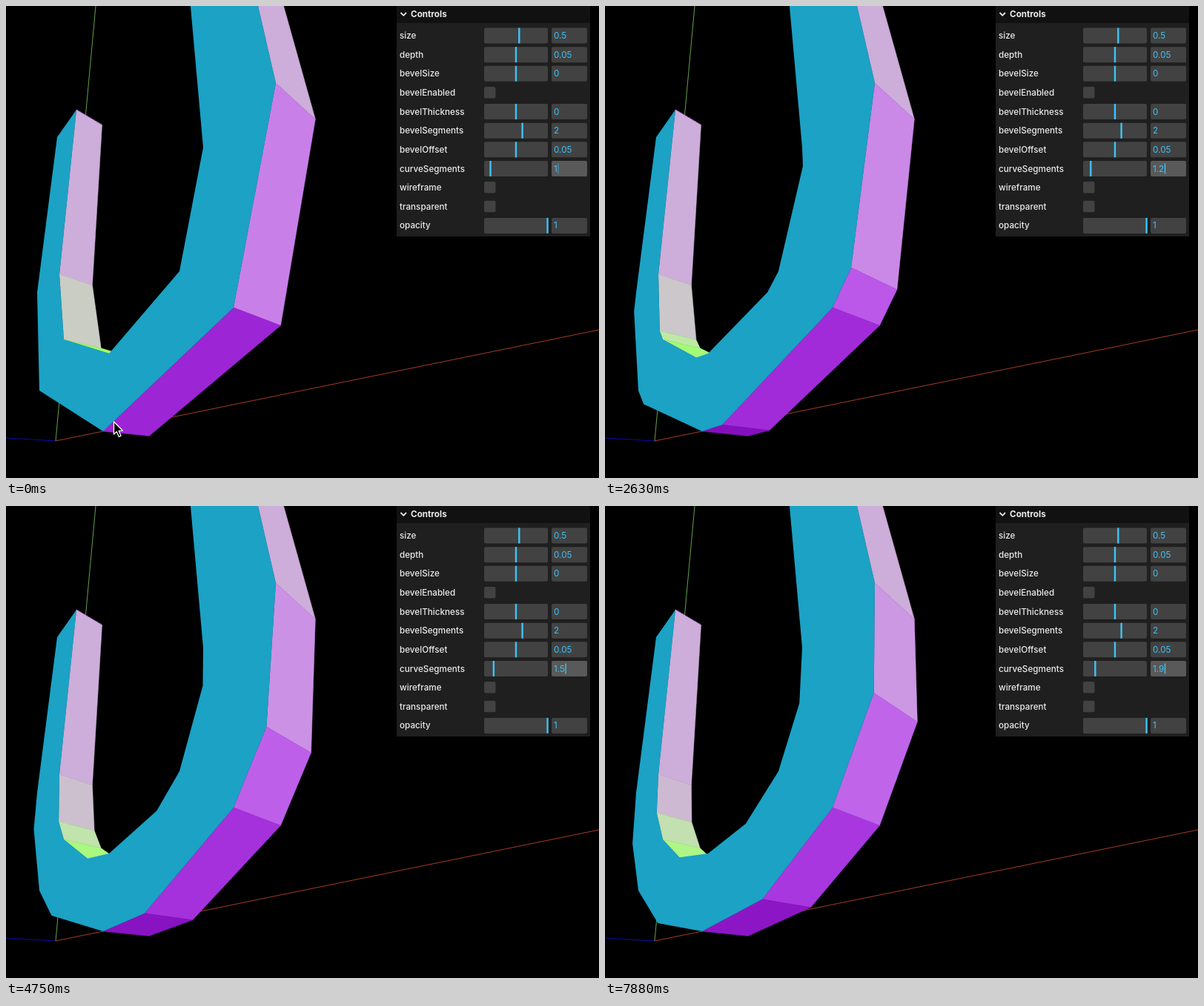
Write an HTML page with a canvas that moves like this. It is 800 px wide and 637 px high and loops after 8 s.

```html
<!DOCTYPE html>
<html lang="en">
<head>
<meta charset="utf-8">
<title>Extruded letter controls</title>
<style>
  html, body { margin: 0; width: 100%; height: 100%; overflow: hidden; background: #000; }
  canvas { display: block; }
</style>
</head>
<body>
<canvas id="stage" width="800" height="637"></canvas>
<script>
const ctx = document.getElementById('stage').getContext('2d');
const LOOP = 8000, STEP = 125;

// Perspective: vanishing point of the extrusion, optical centre and focal length.
const VANISH = [973, 660], CENTER = [186, 390], FOCAL = 545;
const FACE_NORMAL = [-0.791, 0.271, 0.548];

// Front outline, clockwise: [x, y] is a line, [cx, cy, x, y] a quadratic curve.
const OUTLINE = [
  [317, -100], [364, 104],
  [395, 238.5, 307, 407], [228, 553, 131, 574], [66, 587.5, 45, 519], [31, 471, 42, 387],
  [69, 177], [95, 140], [72, 362],
  [64.5, 420, 78, 450], [92.5, 489, 139, 469], [192, 446.5, 234, 358], [273, 269, 266, 191],
  [240, -100]
];

// Times at which curveSegments grows by 0.1.
const KEYS = [1880, 2500, 3250, 4000, 4630, 5380, 6250, 7000, 7500];

const ROWS = [
  ['size', 0.55, '0.5'], ['depth', 0.5, '0.05'], ['bevelSize', 0.5, '0'], ['bevelEnabled'],
  ['bevelThickness', 0.5, '0'], ['bevelSegments', 0.6, '2'], ['bevelOffset', 0.5, '0.05'],
  ['curveSegments'], ['wireframe'], ['transparent'], ['opacity', 0.995, '1']
];

// Inverse depth on the front plane is linear in screen space.
const nearness = ([x, y]) => 0.0107 + 0.000214 * x + 0.0000714 * y;

function extrude(p) {
  const h = nearness(p);
  return p.map((v, i) => (v + h * VANISH[i]) / (1 + h));
}

// Point on a quadratic curve seen in perspective.
function curvePoint(a, c, b, t) {
  const pts = [a, c, b];
  const w = [(1 - t) ** 2, 2 * t * (1 - t), t * t].map((k, i) => k / nearness(pts[i]));
  const sum = w[0] + w[1] + w[2];
  return [0, 1].map(i => (a[i] * w[0] + c[i] * w[1] + b[i] * w[2]) / sum);
}

// A fractional segment count samples each curve at 0 and 1/n only.
function outlinePoints(segments) {
  const pts = [];
  for (const s of OUTLINE) {
    const end = s.slice(-2);
    if (s.length === 4 && segments > 1) {
      pts.push(curvePoint(pts[pts.length - 1], s.slice(0, 2), end, 1 / segments));
    }
    pts.push(end);
  }
  return pts;
}

const toView = p => {
  const z = 1 / nearness(p);
  return [(p[0] - CENTER[0]) * z, (CENTER[1] - p[1]) * z, -FOCAL * z];
};

const normalColor = n => {
  const len = Math.hypot(...n);
  return `rgb(${n.map(v => Math.round((v / len + 1) * 127.5)).join()})`;
};

function sideColor(p, q) {
  const a = toView(p), b = toView(q), n = FACE_NORMAL;
  const d = b.map((v, i) => v - a[i]);
  return normalColor([
    n[1] * d[2] - n[2] * d[1],
    n[2] * d[0] - n[0] * d[2],
    n[0] * d[1] - n[1] * d[0]
  ]);
}

function polygon(pts, color) {
  ctx.beginPath();
  pts.forEach(p => ctx.lineTo(...p));
  ctx.closePath();
  ctx.fillStyle = color;
  ctx.fill();
}

function line(color, width, ...pts) {
  ctx.beginPath();
  pts.forEach(p => ctx.lineTo(...p));
  ctx.strokeStyle = color;
  ctx.lineWidth = width;
  ctx.stroke();
}

function box(x, y, w, h, color, radius = 2) {
  ctx.beginPath();
  ctx.roundRect(x, y, w, h, radius);
  ctx.fillStyle = color;
  ctx.fill();
}

function text(str, x, y, color, weight = 400) {
  ctx.font = `${weight} 11.7px Inter, sans-serif`;
  ctx.fillStyle = color;
  ctx.fillText(str, x, y);
}

function drawLetter(segments) {
  const origin = [67, 587];
  line('#0c0cae', 1, origin, [0, 583]);
  line('#a63c22', 1, origin, [800, 437]);
  line('#64a04a', 1, origin, [121, 0]);

  const pts = outlinePoints(segments);
  for (let i = 1; i < pts.length; i++) {
    const p = pts[i - 1], q = pts[i], back = extrude(p);
    const facing = (q[0] - p[0]) * (back[1] - p[1]) - (q[1] - p[1]) * (back[0] - p[0]);
    if (facing > -1) continue;
    const color = sideColor(p, q);
    polygon([p, q, extrude(q), back], color);
    ctx.strokeStyle = color;
    ctx.lineWidth = 0.5;
    ctx.stroke();
  }
  ctx.setLineDash([3, 2]);
  line('#7d1fa6', 1, [96, 140], [129, 159.5]);
  ctx.setLineDash([]);
  polygon(pts, normalColor(FACE_NORMAL));
}

function drawPanel(segments, caret) {
  const accent = '#3fc3f7';
  box(527, 0, 261, 311, '#1f1f1f', 0);
  box(527, 0, 261, 23, '#111', 0);
  ctx.textBaseline = 'middle';
  line('#ebebeb', 1.8, [532.5, 9], [536.3, 12.8], [540, 9]);
  text('Controls', 546, 11.5, '#ebebeb', 700);

  ROWS.forEach(([name, fraction, value], i) => {
    const y = 40 + 25.64 * i, active = name === 'curveSegments';
    text(name, 531, y + 0.5, '#ebebeb', 500);
    if (active) {
      fraction = segments / 10;
      value = String(segments);
    }
    if (value === undefined) {
      box(645, y - 8, 15.5, 15.5, '#424242');
      return;
    }
    box(645, y - 10.5, 86, 21, '#424242');
    box(736, y - 10.5, 48, 21, active ? '#595959' : '#424242');
    box(645 + 86 * fraction - 1.2, y - 10.5, 2.4, 21, accent, 0);
    text(value, 739, y + 0.5, accent);
    if (active && caret) {
      ctx.globalAlpha = caret;
      box(739.5 + ctx.measureText(value).width, y - 7, 1.4, 14, accent, 0);
      ctx.globalAlpha = 1;
    }
  });
}

function drawPointer(t) {
  const k = Math.min(1, Math.max(0, (Math.floor(t / STEP) * STEP) / 1500));
  const ease = k * k * (3 - 2 * k);
  ctx.save();
  ctx.translate(145.5 + 642.5 * ease, 561 - 335 * ease);
  ctx.lineJoin = 'round';
  polygon([[0, 0], [0, 17], [3.8, 13.5], [6.8, 20.3], [9.6, 19], [6.7, 12.4], [12, 12.2]], '#000');
  ctx.strokeStyle = '#fff';
  ctx.lineWidth = 1.3;
  ctx.stroke();
  ctx.restore();
}

function caretAlpha(t, lastKey) {
  const phase = (t - lastKey) % 1000;
  if (phase < STEP) return lastKey ? 1 : 0.5;
  return phase < 500 ? 1 : phase < 500 + STEP ? 0.5 : 0;
}

function frame() {
  const t = performance.now() % LOOP;
  const pressed = KEYS.filter(k => k <= t);
  const segments = (10 + pressed.length) / 10;
  ctx.fillStyle = '#000';
  ctx.fillRect(0, 0, 800, 637);
  drawLetter(segments);
  drawPanel(segments, caretAlpha(t, pressed[pressed.length - 1] || 0));
  if (t < KEYS[0]) drawPointer(t);
  requestAnimationFrame(frame);
}
frame();
</script>
</body>
</html>
```
